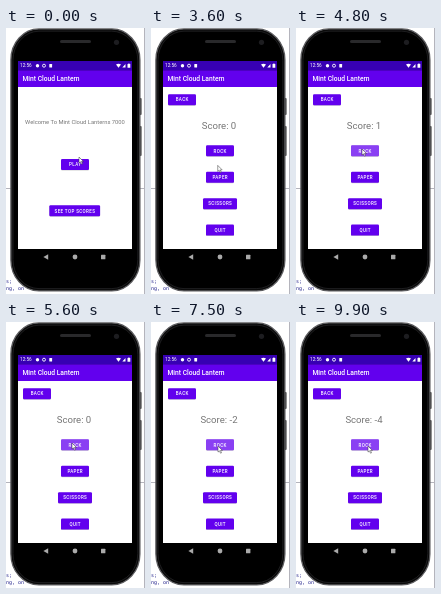
Recreate the animation shown at these times as an HTML page. Size 139 by 266 pixels, loop 10 s.

```html
<!DOCTYPE html>
<html lang="en">
<head>
<meta charset="utf-8">
<title>Phone game</title>
<style>
html, body { margin: 0; width: 100%; height: 100%; overflow: hidden; background: #fff; }
svg { display: block; width: 139px; height: 266px; font-family: Roboto, sans-serif; }
.label { font-size: 4.5px; font-weight: 500; letter-spacing: .38px; fill: #fff; text-anchor: middle; }
.code { font: 5px "DejaVu Sans Mono", monospace; fill: #23238c; }
</style>
</head>
<body>
<svg viewBox="0 0 139 266">
  <defs><clipPath id="screen"><rect x="12" y="59" width="114" height="162"/></clipPath></defs>
  <text class="code" x="0" y="255">s;</text>
  <text class="code" x="-3" y="262">ing, on</text>
  <path d="M138.5 0V266M0 160.5H139" stroke="#b4b4bc"/>

  <rect x="133" y="70" width="2.6" height="17" rx="1" fill="#444"/>
  <rect x="133" y="98" width="2.6" height="30" rx="1" fill="#444"/>
  <rect x="4.9" y=".9" width="129" height="262" rx="28" ry="31" fill="#0a0a0a" stroke="#5c5c5f" stroke-width="1.3"/>
  <rect x="7" y="3.2" width="124.8" height="257.4" rx="26" ry="29" fill="#000" stroke="#242426" stroke-width=".8"/>
  <rect x="54" y="12" width="31" height="3" rx="1.5" fill="#29292b"/>
  <circle cx="110.5" cy="14.3" r="2.6" fill="#1d1d20"/>

  <rect x="12" y="33" width="114" height="9.5" fill="#3700b3"/>
  <g fill="#fff">
    <text x="14" y="39.4" font-size="4.7">12:56</text>
    <circle cx="31.5" cy="37.7" r="1.7"/>
    <circle cx="38" cy="37.7" r="1.5" fill="none" stroke="#fff" stroke-width=".9"/>
    <rect x="43.3" y="36" width="2.8" height="3.5" rx=".5"/>
    <path d="M110 36.6Q112.5 34.9 115 36.6L112.5 39.7ZM116.3 39.6L119.5 36V39.6ZM121.5 36H122.3V35.4H123.5V36H124.3V39.8H121.5Z"/>
  </g>
  <rect x="12" y="42.3" width="114" height="17" fill="#6200ee"/>
  <text x="16.5" y="52.6" font-size="6.7" font-weight="500" fill="#fff">Mint Cloud Lantern</text>
  <rect x="12" y="59" width="114" height="162" fill="#fff"/>

  <g clip-path="url(#screen)">
    <g id="home">
      <text x="69" y="96.2" font-size="5.8" fill="#757575" text-anchor="middle">Welcome To Mint Cloud Lanterns 7000</text>
    </g>
    <g id="game">
      <rect x="12" y="59" width="114" height="162" fill="#fff"/>
      <text id="score" x="68" y="101" font-size="9.6" fill="#757575" text-anchor="middle"></text>
    </g>
  </g>

  <g fill="#aaa">
    <path d="M37.4 229L42.2 226.2V231.8Z"/>
    <circle cx="69" cy="229" r="2.4"/>
    <rect x="95" y="226.8" width="4.4" height="4.4" rx=".5"/>
  </g>
  <path id="cursor" d="M0 0V6.1L1.4 4.8L2.5 7.2L3.5 6.8L2.5 4.5H4.4Z" fill="#fff" stroke="#333" stroke-width=".5"/>
</svg>
<script>
const $ = id => document.getElementById(id);
const clamp = v => Math.max(0, Math.min(1, v));
const ease = v => v * v * (3 - 2 * v);

function addButton(page, label, x, y, w = 28) {
  const id = 'clip' + label.replaceAll(' ', '');
  const box = `x="${x}" width="${w}" height="11" rx="1.2"`;
  $(page).insertAdjacentHTML('beforeend', `
    <clipPath id="${id}"><rect ${box} y="${y}"/></clipPath>
    <rect ${box} y="${y + .5}" opacity=".2"/>
    <rect ${box} y="${y}" fill="#6200ee"/>
    <circle id="${label}" clip-path="url(#${id})" fill="#fff" opacity="0"/>
    <text class="label" x="${x + w / 2 + .2}" y="${y + 7.2}">${label}</text>`);
}
addButton('home', 'PLAY', 55, 131);
addButton('home', 'SEE TOP SCORES', 43.3, 177.3, 50.8);
addButton('game', 'BACK', 17, 66.2);
addButton('game', 'ROCK', 55, 117.3);
addButton('game', 'PAPER', 55, 143.7);
addButton('game', 'SCISSORS', 52, 170.2, 34);
addButton('game', 'QUIT', 55, 196.6);

// time, x, y
const path = [
  [0, 73, 129], [200, 73, 129], [400, 67, 137], [3500, 67, 137], [3800, 66, 138.5],
  [3900, 66, 138.5], [4400, 66, 121], [5700, 66, 121], [6200, 65, 145], [6500, 65, 145],
  [6900, 67, 124], [8100, 67, 124], [8500, 67, 174], [8700, 67, 174], [9100, 72, 124], [10000, 72, 124]
];
// time, button, score afterwards
const clicks = [
  [2850, 'PLAY', 0], [4650, 'ROCK', 1], [5450, 'ROCK', 0], [6250, 'PAPER', -1], [7250, 'ROCK', -2],
  [8550, 'SCISSORS', -3], [9150, 'ROCK', -4], [9400, 'ROCK', -3], [9750, 'ROCK', -4]
];

function cursorAt(t) {
  const i = path.findIndex(p => p[0] > t);
  const [t0, x0, y0] = path[i - 1], [t1, x1, y1] = path[i];
  const k = ease((t - t0) / (t1 - t0));
  return [x0 + (x1 - x0) * k, y0 + (y1 - y0) * k];
}

function draw(t) {
  $('cursor').setAttribute('transform', `translate(${cursorAt(t)})`);

  const open = 1 - (1 - clamp((t - 3000) / 400)) ** 3;
  $('game').setAttribute('opacity', open);
  $('game').setAttribute('transform', `translate(0 ${(1 - open) * 14})`);

  let score = 0;
  for (const [, name] of clicks) $(name).setAttribute('opacity', 0);
  for (const [start, name, result] of clicks) {
    const age = t - start;
    if (age < 0) break;
    if (age >= 100) score = result;
    const [x, y] = cursorAt(start), ripple = $(name);
    ripple.setAttribute('cx', x);
    ripple.setAttribute('cy', y);
    ripple.setAttribute('r', 5 + 24 * ease(clamp(age / 225)));
    ripple.setAttribute('opacity', .25 * (1 - clamp((age - 250) / 200)));
  }
  $('score').textContent = 'Score: ' + score;
}

function tick() {
  draw(Math.floor(performance.now() % 10000 / 100) * 100);
  requestAnimationFrame(tick);
}
tick();
</script>
</body>
</html>
```
